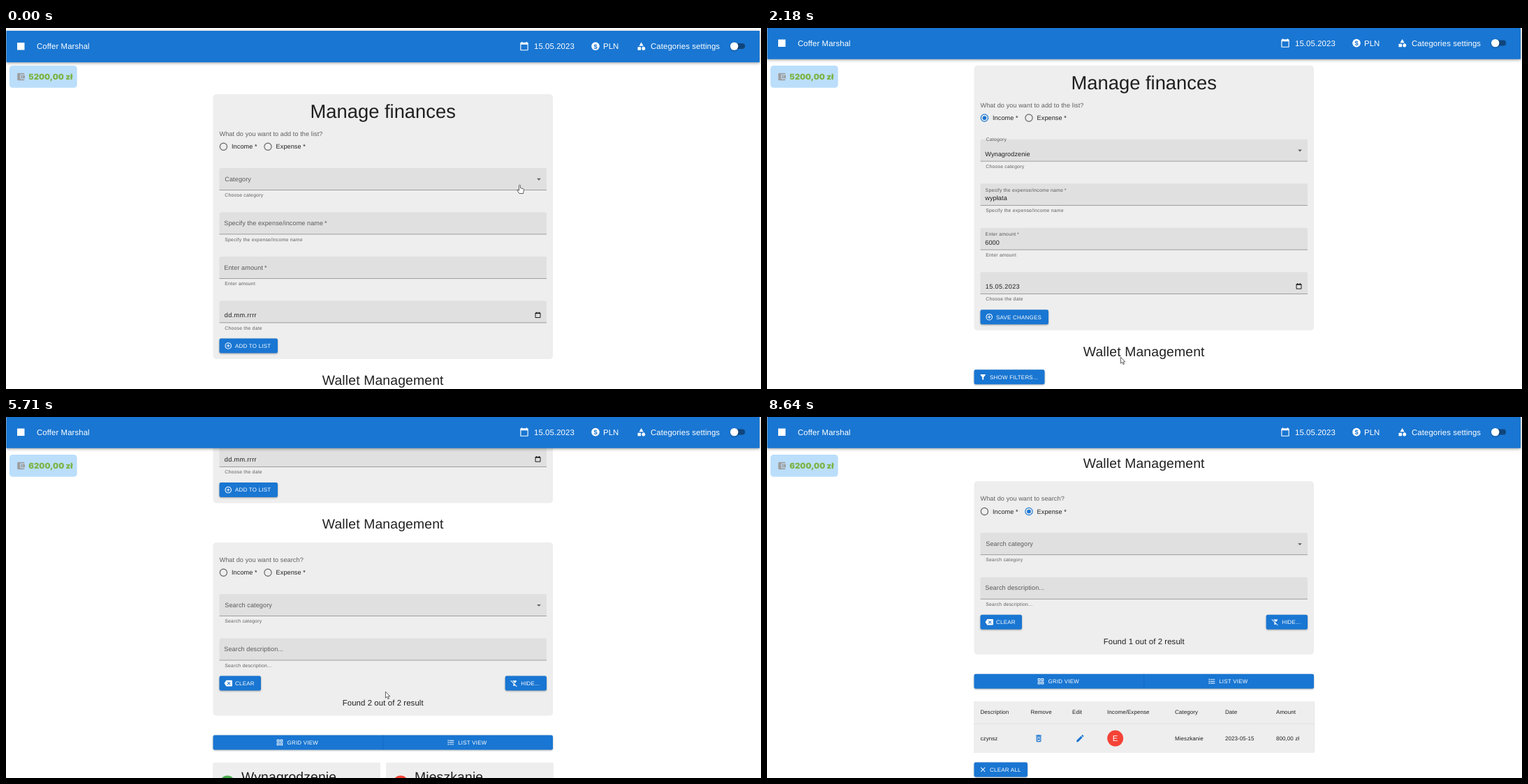
Recreate the animation shown at these times as an HTML page. Size 1081 by 518 pixels, loop 8.71 s.

```html
<!DOCTYPE html>
<html lang="en">
<head>
<meta charset="utf-8">
<title>Coffer Marshal</title>
<style>
html, body { margin: 0; width: 100%; height: 100%; overflow: hidden; }
svg {
  --bg: #fff; --bar: #1976d2; --panel: #eee; --field: #e0e0e0; --ink: rgba(0,0,0,.87);
  --soft: rgba(0,0,0,.6); --line: #8c8c8c; --main: #1976d2; --on: #fff; --hover: #1565c0;
  --table: #eee; --rule: #e0e0e0; --track: #10457c; --thumb: #fff; --letter: #fff;
  display: block; background: var(--bg);
  font-family: "Liberation Sans", Arial, sans-serif; text-rendering: geometricPrecision;
}
svg.dark {
  --bg: #121212; --bar: #272727; --panel: #424242; --field: #535353; --ink: #fff;
  --soft: rgba(255,255,255,.7); --line: #c6c6c6; --main: #90caf9; --on: rgba(0,0,0,.87);
  --hover: #42a5f5; --table: #666; --rule: #515151; --track: #8a8a8a; --thumb: #e0e0e0;
  --letter: #121212;
}
text { fill: var(--ink); white-space: pre; }
.soft { fill: var(--soft); }
.main { fill: var(--main); }
.on { fill: var(--on); }
.white { fill: #fff; }
.letter { fill: var(--letter); }
.panel { fill: var(--panel); }
.field { fill: var(--field); }
.line { fill: var(--line); }
.table { fill: var(--table); }
.rule { fill: var(--rule); }
.raised { filter: drop-shadow(0 1px .8px rgba(0,0,0,.32)); }
.paper { filter: drop-shadow(0 .6px .5px rgba(0,0,0,.25)); }
.bar { fill: var(--bar); filter: drop-shadow(0 1px 2px rgba(0,0,0,.4)); }
.sum { fill: #7cb342; font-family: Inter, "Open Sans", sans-serif; font-weight: 900; }
</style>
</head>
<body>
<svg id="stage" width="1081" height="518" viewBox="0 0 1081 518">
  <g id="page"></g>
  <g id="top"></g>
  <g id="badge"></g>
  <g id="tip"></g>
  <g id="cursor" stroke="#222" stroke-width=".7" stroke-linejoin="round"></g>
</svg>
<script>
const LOOP = 8710;
const $ = id => document.getElementById(id);
const stage = $('stage');

const ICONS = {
  day: 'M20 3h-1V1h-2v2H7V1H5v2H4c-1.1 0-2 .9-2 2v16c0 1.1.9 2 2 2h16c1.1 0 2-.9 2-2V5c0-1.1-.9-2-2-2zm0 18H4V8h16v13z',
  shapes: 'M12 2l-5.5 9h11zM17.5 13a4.5 4.5 0 1 0 .01 0zM3 13.5h8v8H3z',
  add: 'M13 7h-2v4H7v2h4v4h2v-4h4v-2h-4V7zM12 2a10 10 0 1 0 .01 0zm0 18a8 8 0 1 1 .01 0z',
  funnel: 'M4.25 5.61 10 13v6c0 .55.45 1 1 1h2c.55 0 1-.45 1-1v-6l5.74-7.39c.51-.66.04-1.61-.79-1.61H5.04c-.83 0-1.3.95-.79 1.61z',
  funnelOff: 'M19.79 5.61C20.3 4.95 19.83 4 19 4H6.83l7.97 7.97zM2.81 2.81 1.39 4.22 10 13v6c0 .55.45 1 1 1h2c.55 0 1-.45 1-1v-2.17l5.78 5.78 1.41-1.41z',
  grid: 'M3 3v8h8V3zm6 6H5V5h4zm-6 4v8h8v-8zm6 6H5v-4h4zM13 3v8h8V3zm6 6h-4V5h4zm-6 4v8h8v-8zm6 6h-4v-4h4z',
  list: 'M2.5 4.5h3v3h-3zm0 6h3v3h-3zm0 6h3v3h-3zM7 5h14v2H7zm0 6h14v2H7zm0 6h14v2H7z',
  back: 'M22 3H7c-.69 0-1.23.35-1.59.88L0 12l5.41 8.11c.36.53.9.89 1.59.89h15c1.1 0 2-.9 2-2V5c0-1.1-.9-2-2-2zm-3 12.59L17.59 17 14 13.41 10.41 17 9 15.59 12.59 12 9 8.41 10.41 7 14 10.59 17.59 7 19 8.41 15.41 12z',
  bin: 'M14.12 10.47 12 12.59l-2.13-2.12-1.41 1.41L10.59 14l-2.12 2.12 1.41 1.41L12 15.41l2.12 2.12 1.41-1.41L13.41 14l2.12-2.12zM15.5 4l-1-1h-5l-1 1H5v2h14V4zM6 19c0 1.1.9 2 2 2h8c1.1 0 2-.9 2-2V7H6zM8 9h8v10H8z',
  pen: 'M3 17.25V21h3.75L17.81 9.94l-3.75-3.75zM20.71 7.04c.39-.39.39-1.02 0-1.41l-2.34-2.34c-.39-.39-1.02-.39-1.41 0l-1.83 1.83 3.75 3.75z',
  cross: 'M19 6.41 17.59 5 12 10.59 6.41 5 5 6.41 10.59 12 5 17.59 6.41 19 12 13.41 17.59 19 19 17.59 13.41 12z',
  drop: 'M7 10l5 5 5-5z',
  purse: 'M21 18v1c0 1.1-.9 2-2 2H5c-1.1 0-2-.9-2-2V5c0-1.1.9-2 2-2h14c1.1 0 2 .9 2 2v1h-9c-1.1 0-2 .9-2 2v8c0 1.1.9 2 2 2zm-9-2h10V8H12zm4-2.5a1.5 1.5 0 1 1 .01 0z'
};
const CURSORS = {
  arrow: '<path fill="#fff" d="M0 0V9L2 7.2 3.5 10.5 5 9.8 3.6 6.7H6.3Z"/>',
  hand: '<path fill="#fff" d="M-1 .8Q0-.6 1 .8V4.6L5.4 5.8Q6.2 6.2 6 7.5L5 12.5H-.5L-3.6 8Q-3.8 6.6-2.4 7L-1 8.2Z"/>',
  beam: '<path fill="none" d="M-2-4.5H-.6L0-4 .6-4.5H2M0-4V4M-2 4.5H-.6L0 4 .6 4.5H2"/>'
};

// Type styles: size and tracking in em
const TYPE = {
  h3: [27.36, 0], h4: [19.38, .00735], h5: [13.68, 0], h6: [11.4, .0075], body: [9.12, .00938],
  date: [9.12, .04], cell: [7.98, .01071], button: [7.98, .02857], small: [6.84, .0333],
  tip: [6.27, 0], sum: [11.4, 0]
};
const text = (x, y, type, str, cls = '', anchor = 'start') => {
  const [size, track] = TYPE[type];
  return `<text x="${x}" y="${y}" font-size="${size}" letter-spacing="${track * size}" class="${cls}" text-anchor="${anchor}">${str}</text>`;
};
const rect = (x, y, w, h, r, cls, extra = '') =>
  `<rect x="${x}" y="${y}" width="${w}" height="${h}" rx="${r}" class="${cls}" ${extra}/>`;
const icon = (name, x, y, cls, size = 13.68) =>
  `<path class="${cls}" fill-rule="evenodd" transform="translate(${x - size / 2} ${y - size / 2}) scale(${size / 24})" d="${ICONS[name]}"/>`;
const button = (x, y, w, name, label) =>
  rect(x, y, w, 21, 2.3, 'main raised') + icon(name, x + 12.7, y + 10.5, 'on', 11.4) +
  text(x + 22.5, y + 13.3, 'button', label, 'on');
const radio = (x, y, label, on) =>
  `<circle cx="${x}" cy="${y}" r="5.13" fill="none" stroke="var(--${on ? 'main' : 'soft'})" stroke-width="1.14"/>` +
  (on ? `<circle cx="${x}" cy="${y}" r="2.85" class="main"/>` : '') +
  text(x + 11.6, y + 3.1, 'body', label + '\u00a0*');
const avatar = (x, y, kind) =>
  `<circle cx="${x}" cy="${y}" r="11.5" fill="${kind === 'I' ? '#4caf50' : '#f44336'}"/>` +
  text(x, y + 4.1, 'h6', kind, 'letter', 'middle');

function field(y, label, help, { value, select, focus } = {}) {
  const small = value !== undefined || focus;
  const x = select ? 313.3 : 312.3;
  let out = `<path class="field" d="M305.5 ${y + 31.5}V${y + 2.3}q0-2.3 2.3-2.3H771.7q2.3 0 2.3 2.3V${y + 31.5}z"/>` +
    rect(305.5, y + 31, 468.5, focus ? 1.2 : .8, 0, focus ? 'main' : 'line');
  if (label) {
    out += small
      ? text(x + .3, y + (select ? 2.2 : 11.6), 'small', label, focus ? 'main' : 'soft')
      : text(x, y + 18.7, 'body', label, 'soft');
  }
  if (value) out += text(312.3, y + 23.8, 'body', value);
  if (select) out += icon('drop', 763, y + 16, 'soft');
  return out + text(313.3, y + 41, 'small', help, 'soft');
}

function form(s) {
  const edit = s.edit;
  return rect(296.5, 95, 486.5, 380, 4.5, 'panel') +
    text(539.7, 128.8, 'h3', 'Manage finances', '', 'middle') +
    text(305.5, 155, 'body', 'What do you want to add to the list?', 'soft') +
    radio(311.4, 170.3, 'Income', edit) + radio(375, 170.3, 'Expense') +
    field(201, 'Category', 'Choose category', { select: true, value: edit ? 'Wynagrodzenie' : undefined }) +
    field(264.5, 'Specify the expense/income name\u2009*', 'Specify the expense/income name', { value: edit ? 'wypłata' : undefined }) +
    field(328, 'Enter amount\u2009*', 'Enter amount', { value: edit ? s.amount : undefined, focus: s.focus }) +
    field(391.5, '', 'Choose the date') +
    text(312.8, 415, 'date', edit ? '15.05.2023' : 'dd.mm.rrrr') +
    '<path d="M758 408.9h7v6.6h-7zM758 409.6h7M759.7 407.4v1.5M763.3 407.4v1.5" fill="none" stroke="var(--ink)" stroke-width="1"/>' +
    (edit ? button(305.5, 445.5, 97.5, 'add', 'SAVE CHANGES') : button(305.5, 445.5, 83.5, 'add', 'ADD TO LIST'));
}

function filters(s) {
  const y = 531.5;
  return rect(296.5, y, 486.5, 248.5, 4.5, 'panel') +
    text(305.5, y + 27.8, 'body', 'What do you want to search?', 'soft') +
    radio(311.4, y + 43.2, 'Income') + radio(375, y + 43.2, 'Expense', s.only) +
    field(y + 74, 'Search category', 'Search category', { select: true }) +
    field(y + 137.5, 'Search description...', 'Search description...') +
    button(305.5, y + 191.5, 59.5, 'back', 'CLEAR') +
    button(714.7, y + 191.5, 59.3, 'funnelOff', 'HIDE...') +
    text(539.7, y + 234.2, 'h6', `Found ${s.only ? 1 : 2} out of 2 result`, '', 'middle');
}

function table(y, items, only) {
  const cols = only ? [305.5, 377.5, 437, 487, 584, 656, 729] : [305.5, 374.5, 431, 478.5, 570, 657, 727];
  const [bin, pen, face] = only ? [389, 448.4, 498.7] : [385.6, 442, 489.7];
  let out = rect(296, y, 487.5, 32 + 42 * items.length, 2.3, 'table paper');
  ['Description', 'Remove', 'Edit', 'Income/Expense', 'Category', 'Date', 'Amount']
    .forEach((name, i) => out += text(cols[i], y + 18.6, 'cell', name));
  items.forEach((it, i) => {
    const c = y + 53.2 + 42 * i, b = c + 2.8;
    out += rect(296, c - 21.4, 487.5, .8, 0, 'rule') +
      text(cols[0], b, 'cell', it.name) + icon('bin', bin, c, 'main') + icon('pen', pen, c, 'main') +
      avatar(face, c, it.kind) + text(cols[4], b, 'cell', it.group) +
      text(cols[5], b, 'cell', '2023-05-15') + text(cols[6], b, 'cell', it.sum + ' zł');
  });
  return out;
}

const cards = (y, items) => items.map((it, i) => {
  const x = 296 + 248 * i;
  return rect(x, y, 240, 140, 2.3, 'table') + avatar(x + 21, y + 30.3, it.kind) +
    text(x + 41, y + 27.6, 'h4', it.group) + text(x + 41, y + 46.2, 'h6', '2023-05-15') +
    text(x + 9.5, y + 83.6, 'h5', `${it.sum} zł - ${it.name}`) +
    icon('bin', x + 189, y + 119, 'main') + icon('pen', x + 214, y + 119, 'main');
}).join('');

function page(s) {
  const dy = s.filter ? 237.3 : 0, y = 570.6 + dy, top = 609.8 + dy;
  const items = [
    { name: 'wypłata', kind: 'I', group: 'Wynagrodzenie', sum: s.saved ? '7000,00' : '6000,00' },
    { name: 'czynsz', kind: 'E', group: 'Mieszkanie', sum: '800,00' }
  ].slice(s.only ? 1 : 0);
  const half = (x, hot) => hot ? rect(x, y, 243.2, 21, 2.3, '', 'fill="var(--hover)"') : '';
  const end = top + (s.grid ? 140 : 32 + 42 * items.length);
  return form(s) + text(539.7, 511.8, 'h4', 'Wallet Management', '', 'middle') +
    (s.filter ? filters(s) : button(296.5, 531.6, 101, 'funnel', 'SHOW FILTERS...')) +
    rect(296.5, y, 486.5, 21, 2.3, 'main raised') + half(296.5, s.hot === 1) + half(539.8, s.hot === 2) +
    rect(539.4, y, .7, 21, 0, '', 'fill="var(--hover)"') +
    icon('grid', 392, y + 10.5, 'on', 11.4) + text(402.5, y + 13.3, 'button', 'GRID VIEW', 'on') +
    icon('list', 637, y + 10.5, 'on', 11.4) + text(647.2, y + 13.3, 'button', 'LIST VIEW', 'on') +
    (s.grid ? cards(top, items) : table(top, items, s.only)) +
    button(296.5, end + 13.5, 76.5, 'cross', 'CLEAR ALL');
}

const bar = s => rect(.5, -.5, 1078.5, 45.2, 0, 'bar') +
  rect(16, 16.5, 10.5, 10.5, 0, 'white') +
  text(44, 25.6, 'h6', 'Coffer Marshal', 'white') +
  icon('day', 742, 21.5, 'white') + text(756, 25.6, 'h6', '15.05.2023', 'white') +
  '<circle cx="844" cy="21.6" r="5.8" class="white"/>' +
  '<text x="844" y="25" font-size="9.4" font-weight="700" text-anchor="middle" style="fill:var(--bar)">$</text>' +
  text(855, 25.6, 'h6', 'PLN', 'white') +
  icon('shapes', 909.6, 21.8, 'white') + text(923, 25.6, 'h6', 'Categories settings', 'white') +
  rect(1038.5, 17.6, 19.6, 8, 4, '', 'fill="var(--track)"') +
  `<circle cx="${s.dark ? 1054 : 1042.7}" cy="21.6" r="5.7" fill="var(--thumb)" class="raised"/>`;

const badge = s => rect(5, 54, 96.7, 31.7, 4.5, '', 'fill="#bbdefb"') +
  `<g fill="#9e9e9e">${icon('purse', 21.3, 70, '')}</g>` +
  text(32.3, 74.2, 'sum', (s.saved ? '6200' : '5200') + ',00 zł', 'sum');

const tip = s => s.tip
  ? rect(1010, 40.4, 65.3, 11.8, 2, '', 'fill="#616161" fill-opacity=".95"') +
    text(1042.6, 48.5, 'tip', `Switch to ${s.dark ? 'light' : 'dark'} mode`, 'white', 'middle')
  : '';

// Time, scroll offset
const SCROLL = [[70, 0], [720, 200.7], [1620, 200.7], [1780, 252], [1900, 252], [2278, 0],
  [4500, 0], [4760, 179], [5380, 179], [5850, 397.4], [6800, 397.4], [7000, 439.2]];
// Time, x, y, cursor shape from then on
const PATH = [
  [0, 735.5, 225, 'hand'], [250, 735.5, 225, 'arrow'], [960, 735.5, 225, 'arrow'],
  [1300, 732.8, 272, 'arrow'], [1400, 732.8, 272, 'arrow'], [1590, 425, 376, 'hand'],
  [1660, 425, 376, 'arrow'], [1790, 506.5, 472.3, 'hand'], [2000, 506.5, 472.3, 'arrow'],
  [2240, 506.5, 472.3, 'arrow'], [2650, 420, 345, 'beam'], [2800, 345, 345, 'beam'],
  [3650, 345, 345, 'arrow'], [3950, 362, 450, 'hand'], [4450, 362, 450, 'arrow'],
  [4740, 623, 290, 'beam'], [4850, 623, 290, 'arrow'], [5150, 350, 360, 'hand'],
  [5380, 350, 360, 'arrow'], [5950, 662, 415, 'hand'], [6250, 662, 415, 'arrow'],
  [6460, 464.5, 339.5, 'arrow'], [6680, 375, 174, 'hand'], [6860, 375, 174, 'arrow'],
  [7150, 560, 230, 'arrow'], [7480, 1046.5, 20.5, 'hand'], [8080, 1046.5, 20.5, 'arrow'],
  [8300, 960, 140, 'arrow'], [8560, 1086, 210, 'arrow']
];

function track(keys, t) {
  let i = keys.findIndex(k => k[0] > t);
  if (i < 0) i = keys.length;
  const a = keys[Math.max(0, i - 1)], b = keys[Math.min(i, keys.length - 1)];
  const u = b[0] > a[0] ? Math.max(0, (t - a[0]) / (b[0] - a[0])) : 0;
  const e = u * u * (3 - 2 * u);
  return a.map((v, n) => typeof v === 'number' ? v + (b[n] - v) * e : v);
}

function stateAt(t) {
  const within = (a, b) => t >= a && t < b;
  return {
    edit: within(1860, 4100), focus: within(2860, 4100),
    amount: t < 3100 ? '6000' : t < 3320 ? '000' : '7000',
    saved: t >= 4100, grid: within(1630, 6150), filter: t >= 5280, only: t >= 6730,
    hot: within(1570, 1690) || within(6360, 6520) ? 1 : within(5930, 6330) ? 2 : 0,
    dark: within(7560, 8010), tip: within(7520, 8140)
  };
}

let shown = '', shape = '';
function draw(now) {
  const t = now % LOOP, s = stateAt(t), key = JSON.stringify(s);
  if (key !== shown) {
    shown = key;
    stage.classList.toggle('dark', s.dark);
    $('page').innerHTML = page(s);
    $('top').innerHTML = bar(s);
    $('badge').innerHTML = badge(s);
    $('tip').innerHTML = tip(s);
  }
  const y = track(SCROLL, t)[1], [, cx, cy, kind] = track(PATH, t);
  $('page').setAttribute('transform', `translate(0 ${-y})`);
  $('top').setAttribute('transform', `translate(0 ${Math.max(0, 4.5 - y)})`);
  $('cursor').setAttribute('transform', `translate(${cx} ${cy})`);
  if (kind !== shape) $('cursor').innerHTML = CURSORS[shape = kind];
}
const start = performance.now();
function tick() {
  draw(performance.now() - start);
  requestAnimationFrame(tick);
}
tick();
</script>
</body>
</html>
```
